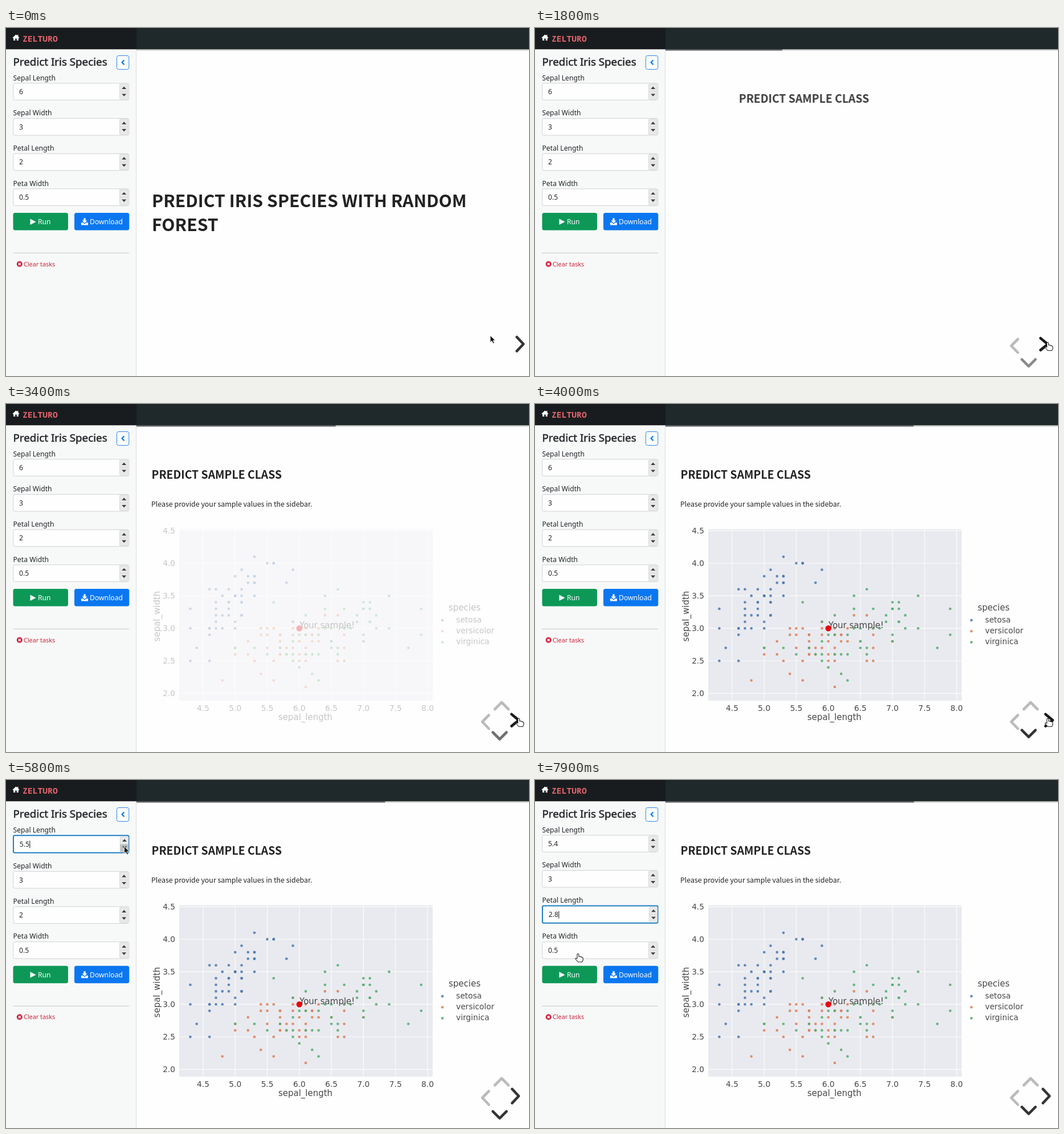
These frames come from a looping animation (918x610 px, 8000 ms). An HTML page:

```html
<!DOCTYPE html>
<html lang="en">
<head>
<meta charset="utf-8">
<title>Iris species slides</title>
<style>
  html, body { margin: 0; width: 100%; height: 100%; overflow: hidden; background: #fefefe; }
  svg { display: block; }
  .ui { font-family: "Noto Sans", "Open Sans", sans-serif; font-size: 12.2px; fill: #212529; }
  .deck { font-family: "Noto Sans CJK JP", "Noto Sans CJK SC", "Noto Sans CJK", "Noto Sans", sans-serif; fill: #222; }
  .plot { font-family: "DejaVu Sans", sans-serif; font-size: 13.75px; fill: #484848; }
  .plot .big { font-size: 15px; }
  .arrow { fill: none; stroke-width: 4.6; stroke-linecap: round; stroke-linejoin: round; }
</style>
</head>
<body>
<svg id="stage" width="918" height="610" viewBox="0 0 918 610">
  <rect width="918" height="610" fill="#fefefe"/>

  <g id="slide1" class="deck" font-size="30.2" font-weight="600">
    <text x="256" y="314">PREDICT IRIS SPECIES WITH RANDOM</text>
    <text x="256" y="356">FOREST</text>
  </g>
  <g id="slide2" class="deck">
    <text x="255.5" y="131" font-size="19.37" font-weight="600">PREDICT SAMPLE CLASS</text>
    <text id="note" x="255" y="180" font-size="12.4">Please provide your sample values in the sidebar.</text>
    <g id="plot" class="plot"></g>
  </g>

  <path id="left" class="arrow" stroke="#bbb" d="M847.5 545.5L836 557L847.5 569"/>
  <path id="up" class="arrow" stroke="#bbb" d="M858 535L870 523L882 535"/>
  <path id="down" class="arrow" d="M854.5 575.5L866.5 587.5L878.5 575.5"/>
  <path id="right" class="arrow"/>

  <rect x="229" y="37" width="689" height="2.6" fill="#c9cdca"/>
  <rect id="bar" x="229" y="37" height="2.6" fill="#686a6a"/>
  <rect x="229" width="689" height="37.3" fill="#1f282a"/>

  <rect y="37" width="229" height="573" fill="#f7f9f8"/>
  <path d="M228.5 37V610" stroke="#dcdfde"/>
  <rect width="229" height="37.3" fill="#191c1e"/>
  <path d="M11.5 17L17.5 11.5L19.8 13.6V12H21.5V15.2L23.5 17L22.5 18L21.8 17.4V22H18.8V18.5H16.2V22H13.2V17.4L12.5 18Z" fill="#fff"/>
  <text x="29" y="23.5" fill="#e4636c" font-family="Noto Sans Mono, monospace" font-size="14.7" font-weight="600">ZELTURO</text>

  <g class="ui">
    <text x="12.5" y="66" font-size="18.8" stroke="#212529" stroke-width=".5">Predict Iris Species</text>
    <rect x="194.5" y="48.5" width="21.3" height="24" rx="3" fill="#fefefe" stroke="#2a84e6"/>
    <path d="M207.6 56.2L203.6 60.2L207.6 64.2" fill="none" stroke="#0a77f0" stroke-width="2.2"/>
    <g id="fields"></g>
    <g id="tail">
      <rect x="12.5" y="324" width="96.5" height="30.5" rx="3.5" fill="#0d9858"/>
      <path d="M42.5 334.5L52.5 339.8L42.5 345Z" fill="#fff"/>
      <text x="56" y="344" fill="#fff">Run</text>
      <rect x="120" y="324" width="96.3" height="30.5" rx="3.5" fill="#0a77f0"/>
      <path d="M136.3 333.5H139.7V337.5H142.5L138 342L133.5 337.5H136.3ZM132 341H135.2L138 343.8L140.8 341H144V345.5H132Z" fill="#fff"/>
      <text x="147" y="344" fill="#fff">Download</text>
      <path d="M12.5 394.5H216" stroke="#c6c8c7"/>
      <circle cx="23.8" cy="413.7" r="5" fill="#d0213b"/>
      <path d="M21.9 411.8L25.7 415.6M25.7 411.8L21.9 415.6" stroke="#fff" stroke-width="1.6"/>
      <text x="31" y="417.6" font-size="10.8" fill="#d0213b">Clear tasks</text>
    </g>
  </g>

  <path id="pointer" fill="#111" stroke="#fff" stroke-width=".9" d="M0 0V12.2L2.9 9.6L5 14.2L7.2 13.2L5.2 8.8H9Z"/>
  <path id="hand" fill="#fff" stroke="#222" stroke-width="1.1" stroke-linejoin="round"
    d="M-1.5 8V1Q0 -1 1.5 1V5Q3.6 4.2 4.4 5.6Q6.4 5 7 6.5Q8.6 6.2 8.8 8V11L7.2 14.5H0L-4.6 9Q-4.6 6.8 -1.5 8.6Z"/>
</svg>

<script>
const LOOP = 8000, NS = "http://www.w3.org/2000/svg";
const $ = id => document.getElementById(id);
const clamp = (v, lo = 0, hi = 1) => Math.max(lo, Math.min(hi, v));

function set(el, attrs) {
  for (const k in attrs) el.setAttribute(k, attrs[k]);
}
function add(parent, tag, attrs, text) {
  const el = document.createElementNS(NS, tag);
  set(el, attrs);
  if (text !== undefined) el.textContent = text;
  return parent.appendChild(el);
}

function bezier(x1, y1, x2, y2) {
  const at = (a, b, u) => 3 * a * u * (1 - u) ** 2 + 3 * b * u * u * (1 - u) + u ** 3;
  return x => {
    let lo = 0, hi = 1;
    for (let i = 0; i < 24; i++) {
      const mid = (lo + hi) / 2;
      if (at(x1, x2, mid) < x) lo = mid; else hi = mid;
    }
    return at(y1, y2, (lo + hi) / 2);
  };
}
const ease = bezier(.25, .1, .25, 1);
const easeOut = bezier(0, 0, .58, 1);
const easeInOut = bezier(.42, 0, .58, 1);
const glide = bezier(.26, .86, .44, 1);
const ramp = (t, start, len, curve) => curve(clamp((t - start) / len));

let seed = 11;
function random() {
  seed = (seed * 16807) % 2147483647;
  return seed / 2147483647;
}
function normal() {
  let sum = -6;
  for (let i = 0; i < 12; i++) sum += random();
  return sum;
}

// Each species is a correlated cloud: mean and spread of length (x) and width (y)
const species = [
  { name: "setosa", color: "#4c7ab2", x: 5, y: 3.43, sx: .35, sy: .38, tie: .74 },
  { name: "versicolor", color: "#de7f58", x: 5.94, y: 2.77, sx: .52, sy: .31, tie: .53 },
  { name: "virginica", color: "#55ad70", x: 6.59, y: 2.97, sx: .64, sy: .32, tie: .46 }
];
const px = v => 346 + (v - 4.5) * 112.57;
const py = v => 507.3 - (v - 2) * 114.1;
const tenth = (v, lo, hi) => clamp(Math.round(v * 10) / 10, lo, hi);

function buildPlot() {
  const g = $("plot");
  const line = d => add(g, "path", { d, stroke: "#fbfbfc", "stroke-width": 1.2 });
  add(g, "rect", { x: 304, y: 219.5, width: 445, height: 300.5, fill: "#e9eaef" });
  for (let v = 4.5; v <= 8; v += .5) {
    line(`M${px(v)} 219.5V520`);
    add(g, "text", { x: px(v), y: 537.5, "text-anchor": "middle" }, v.toFixed(1));
  }
  for (let v = 2; v <= 4.5; v += .5) {
    line(`M304 ${py(v)}H749`);
    add(g, "text", { x: 297, y: py(v) + 5, "text-anchor": "end" }, v.toFixed(1));
  }
  add(g, "text", { class: "big", x: 525.5, y: 554, "text-anchor": "middle" }, "sepal_length");
  add(g, "text", { class: "big", transform: "translate(269.5 372) rotate(-90)", "text-anchor": "middle" }, "sepal_width");
  add(g, "text", { class: "big", x: 777, y: 362 }, "species");
  species.forEach((s, i) => {
    const dot = (cx, cy) => add(g, "circle", { cx, cy, r: 2.3, fill: s.color, "fill-opacity": .88 });
    for (let n = 0; n < 50; n++) {
      const a = normal(), b = s.tie * a + Math.sqrt(1 - s.tie ** 2) * normal();
      dot(px(tenth(s.x + s.sx * a, 4.3, 7.9)), py(tenth(s.y + s.sy * b, 2, 4.4)));
    }
    dot(766, 379 + 19.3 * i);
    add(g, "text", { x: 790, y: 382.6 + 19.3 * i }, s.name);
  });
  add(g, "circle", { cx: px(6), cy: py(3), r: 5.2, fill: "#ea0512" });
  add(g, "text", { class: "big", x: 515, y: 392.8 }, "Your sample!");
}

const fields = ["Sepal Length", "Sepal Width", "Petal Length", "Peta Width"].map(label => {
  const g = add($("fields"), "g", {});
  add(g, "text", { x: 12.5, y: 91.5 }, label);
  const box = add(g, "rect", { fill: "#fefefe" });
  const inner = add(g, "g", {});
  const value = add(inner, "text", { x: 23, y: 116 });
  const caret = add(inner, "rect", { y: 105.5, width: 1, height: 13, fill: "#111" });
  add(inner, "rect", { x: 199.5, y: 98, width: 14.5, height: 27, rx: 1.5, fill: "#e8e9e8", stroke: "#d2d4d3", "stroke-width": .8 });
  const key = y => add(inner, "rect", { x: 199.5, y, width: 14.5, height: 13.5, fill: "#bfc1c0" });
  const upKey = key(98), downKey = key(111.5);
  add(inner, "path", { d: "M199.5 111.5H214", stroke: "#d2d4d3", "stroke-width": .8 });
  add(inner, "path", { d: "M203.2 107L207.2 102.6L211.2 107ZM203.2 115.4L207.2 119.8L211.2 115.4Z", fill: "#3c3f41" });
  return { g, box, inner, value, caret, upKey, downKey };
});

// Value steps: one on press, then a quick repeat while held
function steps(t, press, repeat, max) {
  if (t < press) return 0;
  return clamp(2 + Math.floor((t - repeat) / 62), 1, max);
}

const DOWN = 5250, UP = 6720;

function drawFields(t) {
  const focus = t < DOWN ? 9 : t < UP - 40 ? 0 : 2;
  const show = v => String(+v.toFixed(1));
  const values = [
    show(6 - steps(t, DOWN, DOWN + 320, 6) / 10), "3",
    show(2 + steps(t, UP, UP + 470, 8) / 10), "0.5"
  ];
  fields.forEach((f, i) => {
    const on = i === focus;
    set(f.g, { transform: `translate(0 ${61.7 * i + (i > focus ? 1.8 : 0)})` });
    set(f.box, on
      ? { x: 13, y: 97.2, width: 202.5, height: 30.2, rx: 2, stroke: "#1f7fc8", "stroke-width": 2 }
      : { x: 12.8, y: 96.8, width: 203, height: 29.5, rx: 3, stroke: "#cfd3d2", "stroke-width": 1 });
    set(f.inner, { transform: on ? "translate(.8 .9)" : "" });
    f.value.textContent = values[i];
    set(f.caret, { x: 23.3 + f.value.getComputedTextLength(), opacity: on ? 1 : 0 });
    set(f.downKey, { opacity: i === 0 && t >= DOWN && t < DOWN + 610 ? 1 : 0 });
    set(f.upKey, { opacity: i === 2 && t >= UP && t < UP + 880 ? 1 : 0 });
  });
  set($("tail"), { transform: `translate(0 ${focus < 9 ? 1.8 : 0})` });
}

// Rises from a to peak b, falls back to rest at c
const kick = (p, a, b, c) => p < b ? ramp(p, a, b - a, easeOut) : 1 - ramp(p, b, c - b, easeOut);
function bounce(t) {
  const p = (t + LOOP) % 2000;
  return 10 * kick(p, 200, 400, 500) - 5 * kick(p, 500, 600, 800);
}

const NEXT = 1420, FRAG1 = 2670, FRAG2 = 3360;

function drawSlides(t) {
  const go = ramp(t, NEXT, 800, glide);
  set($("slide1"), { transform: `translate(${-954 * go} 0)`, opacity: 1 - go });
  set($("slide2"), { transform: `translate(${954 * (1 - go)} 0)`, opacity: go });
  set($("note"), { opacity: ramp(t, FRAG1, 200, ease) });
  set($("plot"), { opacity: ramp(t, FRAG2, 200, ease) });
  const part = (go + .45 * ramp(t, FRAG1, 800, glide) + .45 * ramp(t, FRAG2, 800, glide)) / 3;
  set($("bar"), { width: 689 * part });
}

function drawArrows(t, hover) {
  const dx = bounce(t < NEXT ? t + 410 : t - 1660), dy = bounce(t - 1370);
  set($("right"), {
    d: hover ? "M887.3 543.8L900 554.2L887.3 564.6" : "M888.3 541.7L900 554L888.3 566.3",
    stroke: hover ? "#191919" : "#353535",
    "stroke-width": hover ? 5 : 4.4,
    transform: `translate(${dx} 0)`
  });
  const shown = ramp(t, NEXT, 200, ease), grey = Math.round(138 - 86 * ramp(t, FRAG2, 200, ease));
  set($("left"), { opacity: shown });
  set($("down"), { opacity: shown, stroke: `rgb(${grey},${grey},${grey})`, transform: `translate(0 ${dy})` });
  set($("up"), { opacity: ramp(t, FRAG1, 200, ease) });
}

// Pointer moves: start, end, x, y
const moves = [
  [550, 900, 900, 551], [4220, 4400, 284, 234], [4520, 4700, 202, 159],
  [4820, 5000, 208.5, 123], [5080, 5230, 207.5, 116.5], [6020, 6600, 207.5, 226],
  [7650, 7900, 75.5, 304.5]
];
function pointerAt(t) {
  let x = 850, y = 539;
  for (const [a, b, nx, ny] of moves) {
    const k = ramp(t, a, b - a, easeInOut);
    x += (nx - x) * k;
    y += (ny - y) * k;
  }
  return [x, y];
}

function draw(t) {
  const [x, y] = pointerAt(t);
  const hover = x > 884 && y > 535;
  const hand = hover || t > 7880;
  drawSlides(t);
  drawArrows(t, hover);
  drawFields(t);
  const transform = `translate(${x} ${y})`;
  set($("pointer"), { transform, opacity: hand ? 0 : 1 });
  set($("hand"), { transform, opacity: hand ? 1 : 0 });
}

buildPlot();
const begin = performance.now();
function tick() {
  draw((performance.now() - begin) % LOOP);
  requestAnimationFrame(tick);
}
draw(0);
requestAnimationFrame(tick);
</script>
</body>
</html>
```
